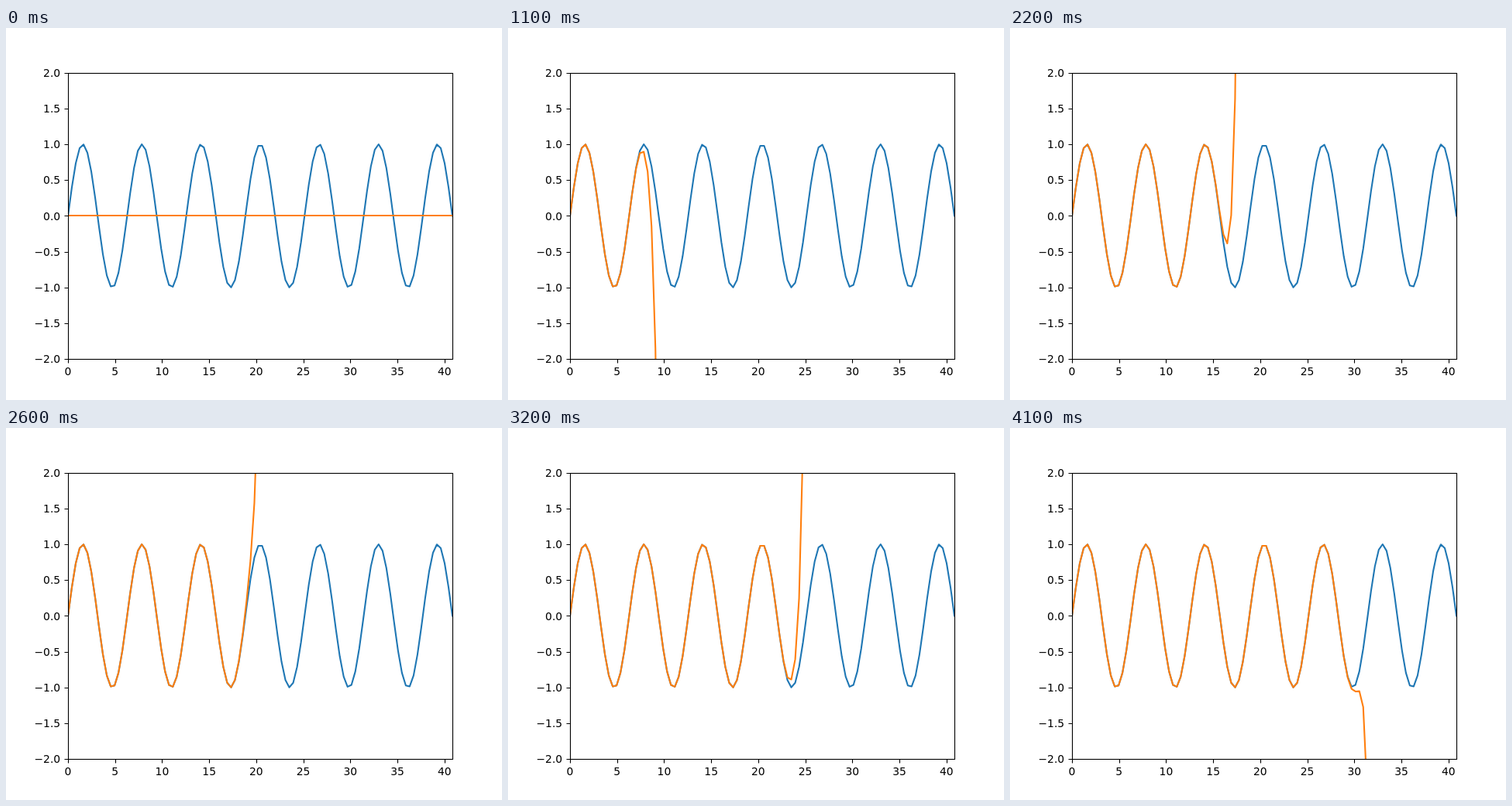
An HTML page for the animation above (4200 ms loop, 640 px wide and 480 px high).

```html
<!DOCTYPE html>
<html lang="en">
<head>
<meta charset="utf-8">
<title>Taylor series of sine</title>
<style>
  html, body { margin: 0; width: 100%; height: 100%; overflow: hidden; background: #fff; }
  svg { display: block; }
  text { font: 13.889px "DejaVu Sans", sans-serif; }
  .curve { fill: none; stroke-width: 2.083; stroke-linejoin: round; stroke-linecap: square; }
  .axis { fill: none; stroke: #000; stroke-width: 1.111; }
</style>
</head>
<body>
<svg width="640" height="480" viewBox="0 0 640 480">
  <clipPath id="plot"><rect x="80" y="58" width="496" height="369"/></clipPath>
  <g clip-path="url(#plot)">
    <path id="sine" class="curve" stroke="#1f77b4"/>
    <path id="series" class="curve" stroke="#ff7f0e"/>
  </g>
  <path id="ticks" class="axis"/>
  <rect class="axis" x="80.5" y="58.5" width="496" height="369"/>
  <g id="labels"></g>
</svg>
<script>
const STEP_MS = 100, LOOP_MS = 4200, POINTS = 100, X_MAX = 13 * Math.PI;
const $ = id => document.getElementById(id);
const px = x => 80 + x / X_MAX * 496;
const py = y => 242.4 - y * 92.4;
const snap = v => Math.round(v) + 0.5;

function curve(f) {
  let d = '';
  for (let i = 0; i < POINTS; i++) {
    const x = X_MAX * i / (POINTS - 1);
    const y = Math.max(-1000, Math.min(1000, f(x)));
    d += (i ? 'L' : 'M') + px(x).toFixed(3) + ' ' + py(y).toFixed(3);
  }
  return d;
}

// Partial sum of x - x^3/3! + x^5/5! - ...
function taylor(x, terms) {
  let sum = 0, term = x;
  for (let k = 1; k <= terms; k++) {
    sum += term;
    term *= -x * x / (2 * k * (2 * k + 1));
  }
  return sum;
}

function label(str, x, y, anchor) {
  const t = document.createElementNS('http://www.w3.org/2000/svg', 'text');
  t.setAttribute('x', x);
  t.setAttribute('y', y);
  t.setAttribute('text-anchor', anchor);
  t.textContent = str;
  $('labels').append(t);
}

function drawAxes() {
  let d = '';
  for (let x = 0; x <= 40; x += 5) {
    d += `M${snap(px(x))} 427.5v5`;
    label(x, px(x).toFixed(2), 448, 'middle');
  }
  for (let y = -2; y <= 2; y += 0.5) {
    d += `M80.5 ${snap(py(y))}h-5`;
    label(y.toFixed(1).replace('-', '\u2212'), 70.2, Math.round(py(y) + 5.28), 'end');
  }
  $('ticks').setAttribute('d', d);
}

let shown = -1;
function draw() {
  const step = Math.floor(performance.now() % LOOP_MS / STEP_MS);
  const terms = Math.max(0, step - 1);
  if (terms !== shown) {
    shown = terms;
    // The flat line sits on whole pixels
    $('series').setAttribute('d', terms ? curve(x => taylor(x, terms)) : 'M80 242H576');
  }
  requestAnimationFrame(draw);
}

drawAxes();
$('sine').setAttribute('d', curve(Math.sin));
draw();
</script>
</body>
</html>
```
